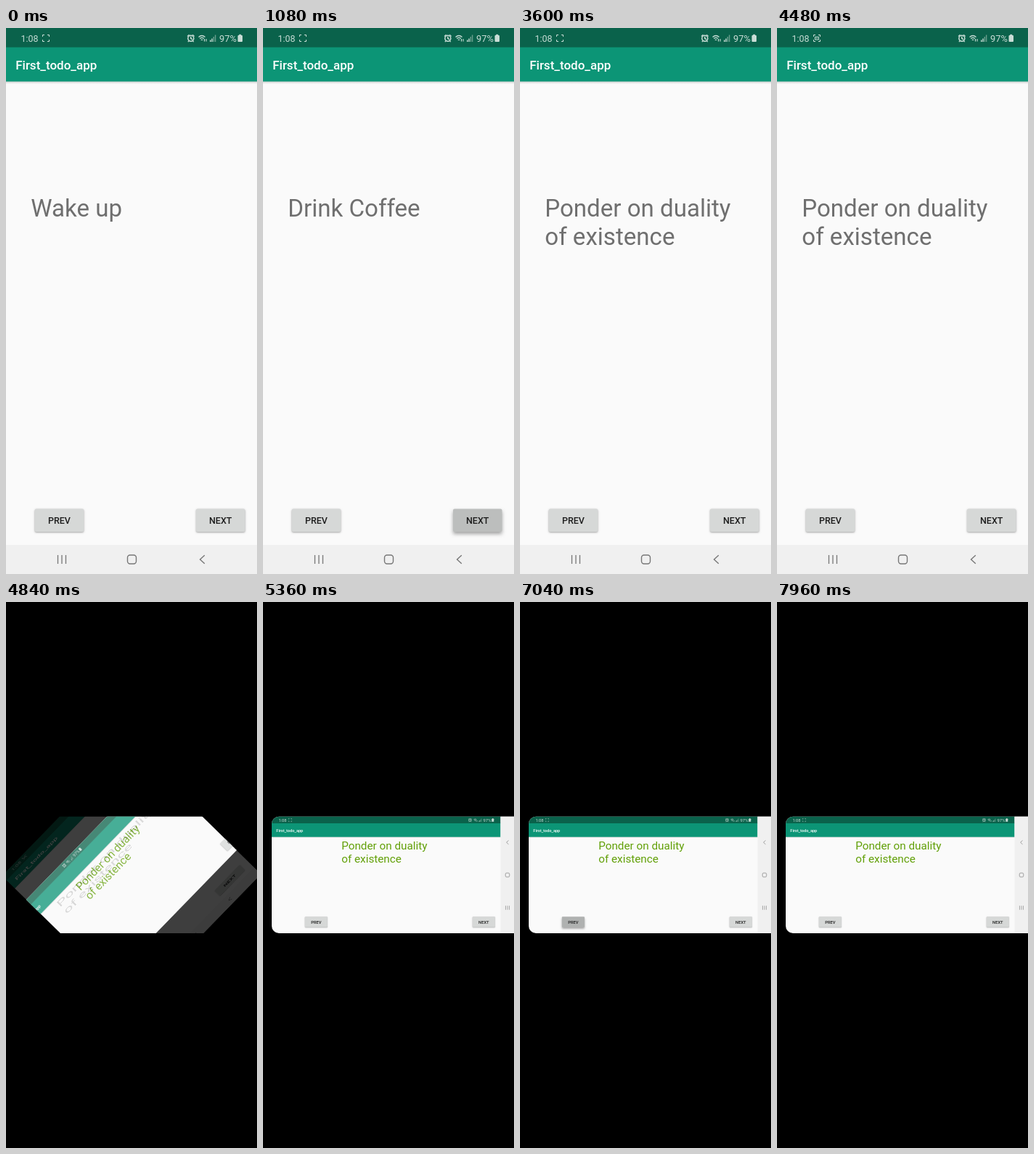
Write an HTML page with a canvas that moves like this. It is 346 px wide and 750 px high and loops after 8000 ms.

```html
<!DOCTYPE html>
<html lang="en">
<head>
<meta charset="utf-8">
<title>Todo app</title>
<style>
  html, body { margin: 0; width: 346px; height: 750px; overflow: hidden; background: #000; }
  canvas { display: block; }
</style>
</head>
<body>
<canvas id="stage" width="346" height="750"></canvas>
<script>
const c = document.getElementById('stage').getContext('2d');
const W = 346, H = 750, LOOP = 8000, K = W / H;
const TURN = 4680, TURN_MS = 440, RELEASE = 120;
const BAR = '#0c9576', STATUS = '#0a624b', PAGE = '#fafafa', NAV = '#f0f0f0';
const PONDER = ['Ponder on duality', 'of existence'];

// Each tap shows its task when the finger lifts.
const taps = [
  { at: 790, button: 'NEXT', task: ['Drink Coffee'] },
  { at: 2020, button: 'PREV', task: ['Wake up'] },
  { at: 2840, button: 'PREV', task: PONDER },
  { at: 6060, button: 'NEXT', task: ['Wake up'] },
  { at: 6860, button: 'PREV', task: PONDER }
];

const clamp = v => Math.max(0, Math.min(1, v));
const smooth = v => v * v * (3 - 2 * v);

function rect(x, y, w, h, color, r = 0) {
  c.fillStyle = color;
  c.beginPath();
  c.roundRect(x, y, w, h, r);
  c.fill();
}

function text(str, x, y, size, color, weight = 400, align = 'left') {
  c.font = `${weight} ${size}px Roboto, sans-serif`;
  c.textAlign = align;
  c.fillStyle = color;
  c.fillText(str, x, y);
}

function stroke(path, color, width) {
  c.strokeStyle = color;
  c.lineWidth = width;
  c.stroke(new Path2D(path));
}

function at(x, y, scale, draw) {
  c.save();
  c.translate(x, y);
  c.scale(scale, scale);
  draw();
  c.restore();
}

function taskAt(t) {
  let task = ['Wake up'];
  for (const tap of taps) if (t >= tap.at + RELEASE) task = tap.task;
  return task;
}

function status(width, t) {
  const ink = '#c9ddd6', x = width - W;
  text('1:08', 20.5, 18.5, 12.4, ink);
  stroke('M50.5 12V9.5H53M57 9.5H59.5V12M59.5 16V18.5H57M53 18.5H50.5V16', ink, 1);
  const blink = t % 2000;
  if (blink > 100 && blink < 900) {
    stroke('M52.5 12.2H57.5V16H52.5Z', ink, 1);
    rect(54.2, 13.3, 1.6, 1.6, ink, 1);
  }
  c.save();
  c.translate(x, 0);
  stroke('M250.8 14.3a4 4 0 1 0 8 0a4 4 0 1 0 -8 0M254.8 11.8V14.5L257 15.7', ink, 1.5);
  stroke('M250 11.5L252.5 9.3M259.6 11.5L257.1 9.3M252 18L250.8 19M257.6 18L258.8 19', ink, 1.3);
  stroke('M265.5 12.5Q270 8.6 274.5 12.5M267.2 14.6Q270 12.2 272.8 14.6M268.8 16.6Q270 15.6 271.2 16.6', ink, 1.3);
  stroke('M273.5 18.5V15M276 15V18.5', ink, 1.1);
  stroke('M281.7 19V16.5M284 19V14.5', ink, 1.4);
  stroke('M286.3 19V12M288.6 19V9.5', '#6ca08f', 1.4);
  text('97%', 294, 18.5, 12.8, ink);
  rect(319.5, 10, 6.5, 9, ink, 1);
  rect(321.2, 8.8, 3, 2, ink);
  c.restore();
}

function button(x, y, label, t, scale) {
  const tap = taps.find(p => p.button === label && t >= p.at && t < p.at + 460);
  const age = tap ? t - tap.at : 0;
  const fade = tap ? 1 - clamp((age - 200) / 260) : 0;
  const lift = Math.min(clamp(age / 90), fade);
  c.save();
  c.shadowColor = 'rgba(0,0,0,.35)';
  c.shadowBlur = (2.5 + 4 * lift) * scale;
  c.shadowOffsetY = (1 + 3 * lift) * scale;
  rect(x, y, 67.5, 31.5, '#d6d8d7', 2);
  c.restore();
  if (tap) {
    c.save();
    c.beginPath();
    c.roundRect(x, y, 67.5, 31.5, 2);
    c.clip();
    rect(x, y, 68, 32, `rgba(0,0,0,${.09 * lift})`);
    c.fillStyle = `rgba(0,0,0,${.1 * fade})`;
    c.beginPath();
    c.arc(x + 18, y + 16, Math.min(70, age * .35), 0, 7);
    c.fill();
    c.restore();
  }
  text(label, x + 33.7, y + 20.7, 12.5, '#1d1d1d', 500, 'center');
}

const navIcons = {
  recents: () => stroke('M-5.5 -6V6M0 -6V6M5.5 -6V6', '#777', 1.3),
  home: () => {
    c.strokeStyle = '#777';
    c.lineWidth = 1.4;
    c.beginPath();
    c.roundRect(-6, -6, 12, 12, 3.5);
    c.stroke();
  },
  back: () => stroke('M3.3 -5.8L-3 0L3.3 5.8', '#777', 1.4)
};

function portrait(t) {
  rect(0, 0, W, H, PAGE);
  const edge = c.createLinearGradient(0, 73, 0, 77);
  edge.addColorStop(0, 'rgba(0,0,0,.18)');
  edge.addColorStop(1, 'rgba(0,0,0,0)');
  rect(0, 73, W, 4, edge);
  rect(0, 26, W, 47.5, BAR);
  rect(0, 0, W, 26.5, STATUS);
  status(W, t);
  text('First_todo_app', 13.2, 56.5, 17, '#fff', 500);
  taskAt(t).forEach((line, i) => text(line, 34.3, 259 + i * 39, 33.1, '#6f6f6f'));
  button(39.7, 660.5, 'PREV', t, 1);
  button(262, 660.5, 'NEXT', t, 1);
  rect(0, 710, W, 40, NAV);
  at(77, 730, 1, navIcons.recents);
  at(173.5, 730, 1, navIcons.home);
  at(270.5, 730, 1, navIcons.back);
}

function landscape(t, statusWidth) {
  c.save();
  c.beginPath();
  c.roundRect(12, 294.7, 334, 160.3, [10, 0, 0, 10]);
  c.clip();
  rect(12, 294, 334, 162, PAGE);
  rect(12, 322.5, 315.5, 1, 'rgba(0,0,0,.15)');
  rect(12, 303.5, 315.5, 19.2, BAR);
  rect(12, 294, 315.5, 10, STATUS);
  rect(327.5, 294, 19, 162, NAV);
  at(12, 293.1, K, () => status(statusWidth, t));
  text('First_todo_app', 18.3, 315.7, 5.6, '#fff', 500);
  taskAt(t).forEach((line, i) => text(line, 108.2, 340 + i * 18, 15.27, '#62a008'));
  at(57.8, 432.3, K, () => button(0, 0, 'PREV', t, K));
  at(288.8, 432.3, K, () => button(0, 0, 'NEXT', t, K));
  at(337, 330.2, K, navIcons.back);
  at(337, 375, K, navIcons.home);
  at(337, 420, K, navIcons.recents);
  c.restore();
}

// The old screen fades over the new one while both turn inside a stretching crop.
function turning(t) {
  const p = smooth(((t - TURN) / TURN_MS) ** .7);
  const long = W, short = W * K;
  const w = short + (long - short) * p, h = long - (long - short) * p;
  c.save();
  c.beginPath();
  c.rect(0, 294.7, W, 160.3);
  c.clip();
  c.translate(W / 2, H / 2);
  c.rotate((p - 1) * Math.PI / 2);
  c.beginPath();
  c.rect(-w / 2, -h / 2, w, h);
  c.clip();
  c.save();
  c.translate(-W / 2, -H / 2);
  landscape(t, 320);
  c.restore();
  // Black veil plus additive old screen gives a true cross-fade of the whole layer.
  const alpha = clamp(1 - 1.53 * p);
  if (alpha > 0) {
    old.globalAlpha = 1;
    c.globalAlpha = alpha;
    c.drawImage(old.canvas, -w / 2, -h / 2, w, h);
  }
  c.restore();
}

const old = document.createElement('canvas').getContext('2d');
old.canvas.width = W;
old.canvas.height = H;

function keepOldScreen() {
  portrait(TURN);
  old.drawImage(c.canvas, 0, 0);
}

function frame() {
  const t = performance.now() % LOOP;
  rect(0, 0, W, H, '#000');
  if (t < TURN) portrait(t);
  else if (t < TURN + TURN_MS) turning(t);
  else landscape(t, 315.5 / K);
  requestAnimationFrame(frame);
}

keepOldScreen();
frame();
</script>
</body>
</html>
```
